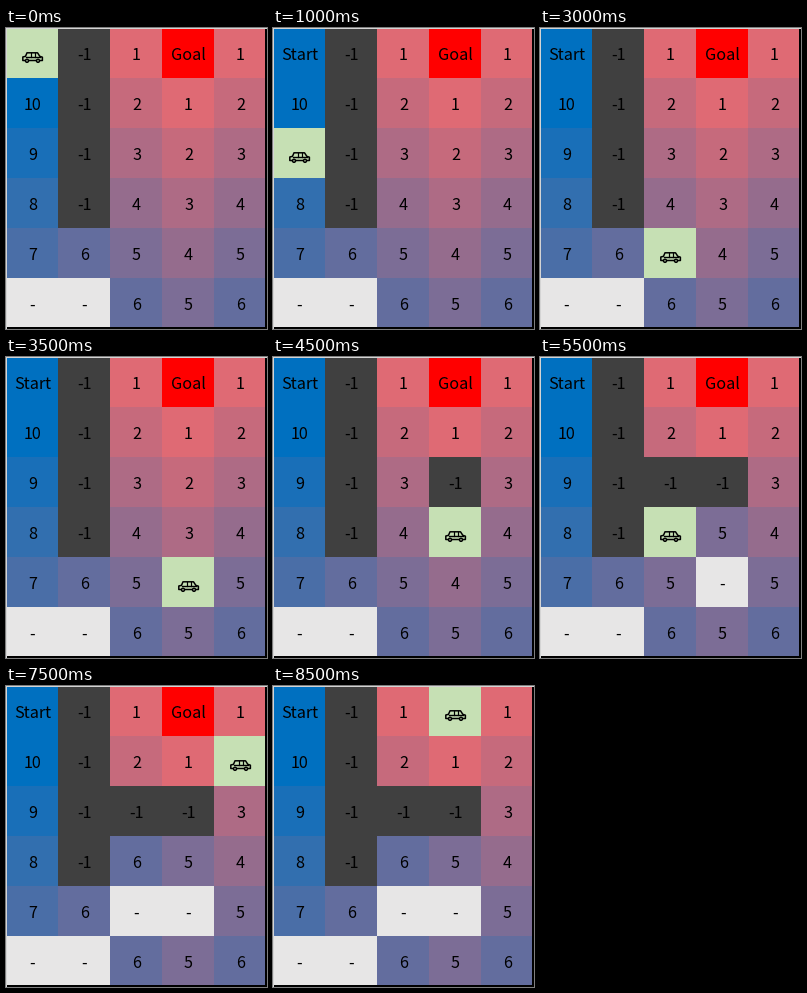
These frames come from a looping animation (261x301 px, 9000 ms). A matplotlib script:

```python
from itertools import product

import matplotlib.pyplot as plt
from matplotlib.animation import FuncAnimation
from matplotlib.patches import Circle, Polygon, Rectangle
from matplotlib.transforms import Affine2D

W, H, DPI = 261, 301, 64
PX = 72 / DPI  # points per pixel
ROWS, COLS = 6, 5
CELL_W, CELL_H = 52, 50
STEPS, STEP_MS = 18, 500

START, GOAL = (0, 0), (0, 3)
WALLS = {(r, 1) for r in range(4)}
HIDDEN_WALLS = {(2, 2), (2, 3)}  # found only when the car reaches them
UNSEEN = {(5, 0), (5, 1)}
CELLS = list(product(range(ROWS), range(COLS)))

COLD, HOT = (0, 112, 192), (248, 105, 107)
CAR_FILL, START_FILL, GOAL_FILL = "#c6e0b4", "#0070c0", "#ff0000"
WALL_FILL, BLANK_FILL = "#404040", "#e7e6e6"
WALL, BLANK = -1, None


def neighbours(cell):
    """Left, right, up, down: earlier ones win ties."""
    r, c = cell
    around = [(r, c - 1), (r, c + 1), (r - 1, c), (r + 1, c)]
    return [n for n in around if n in CELLS]


def goal_distances():
    dist = dict.fromkeys(CELLS, BLANK)
    dist.update(dict.fromkeys(WALLS, WALL))
    dist[GOAL] = 0
    queue = [GOAL]
    for cell in queue:
        for n in neighbours(cell):
            if dist[n] is BLANK and n not in UNSEEN:
                dist[n] = dist[cell] + 1
                queue.append(n)
    return dist


def best_neighbour(dist, car):
    options = [n for n in neighbours(car) if dist[n] not in (WALL, BLANK)]
    return min(options, key=dist.get)


def replan(dist, car):
    """Blank the cells that relied on the car's cell, then re-cost it."""
    old = dist[car]
    for n in neighbours(car):
        support = [m for m in neighbours(n) if m != car and dist[m] == old]
        if dist[n] == old + 1 and not support:
            dist[n] = BLANK
    dist[car] = dist[best_neighbour(dist, car)] + 1


def simulate():
    dist, car, bumped = goal_distances(), START, False
    states = [(car, dict(dist))]
    while len(states) < STEPS:
        if bumped:
            replan(dist, car)
        target = best_neighbour(dist, car)
        bumped = target in HIDDEN_WALLS
        if bumped:
            dist[target] = WALL
        else:
            car = target
        states.append((car, dict(dist)))
    return states


def cell_look(cell, value):
    if cell == START:
        return "Start", START_FILL
    if cell == GOAL:
        return "Goal", GOAL_FILL
    if value is BLANK:
        return "-", BLANK_FILL
    if value == WALL:
        return "-1", WALL_FILL
    k = value / 10
    return str(value), tuple((h + (c - h) * k) / 255 for h, c in zip(HOT, COLD))


fig = plt.figure(figsize=(W / DPI, H / DPI), dpi=DPI, facecolor="white")
ax = fig.add_axes([0, 0, 1, 1])
ax.set_xlim(0, W)
ax.set_ylim(H, 0)
ax.axis("off")


def box(x, y, w, h, color, z=1):
    return ax.add_patch(Rectangle((x, y), w, h, fc=color, lw=0, aa=False, zorder=z))


box(0, 0, W, H, "#d4d4d4", 0)
box(W - 2, 1, 2, H - 1, "black", 3)
box(1, H - 2, W - 1, 2, "black", 3)

tiles, labels = {}, {}
for r, c in CELLS:
    x, y = c * CELL_W, r * CELL_H
    left, top = max(x, 1), max(y, 1)
    tiles[r, c] = box(left, top, x + CELL_W - left, y + CELL_H - top, "white")
    labels[r, c] = ax.text(x + 26.5, y + 32, "", fontsize=16.2 * PX,
                           family="Noto Sans CJK JP", color="black",
                           ha="center", va="baseline", zorder=2)

car_pos = Affine2D()
car_tr = car_pos + ax.transData


def car_patch(patch, width):
    patch.set(facecolor=CAR_FILL, edgecolor="black", linewidth=width * PX,
              transform=car_tr, zorder=4, joinstyle="round")
    ax.add_artist(patch)


def car_line(xs, ys, width):
    ax.add_artist(plt.Line2D(xs, ys, color="black", lw=width * PX,
                             transform=car_tr, zorder=4))


# bonnet, cabin and boot outline, then belt line, posts and wheels
car_patch(Polygon([(16.8, 32.5), (16.8, 29), (19.5, 28.3), (21, 24.8),
                   (31.5, 24.8), (33.8, 28.3), (36.4, 29.2), (36.4, 32.5)]), 1.5)
car_line([19.5, 34], [28.5, 28.5], 1.4)
for x in (24.5, 28.5):
    car_line([x, x], [24.8, 28.5], 1.2)
for x in (21, 32):
    car_patch(Circle((x, 32.8), 1.5), 1.5)

STATES = simulate()


def draw(step):
    car, dist = STATES[step]
    for cell, value in dist.items():
        text, fill = ("", CAR_FILL) if cell == car else cell_look(cell, value)
        labels[cell].set_text(text)
        tiles[cell].set_facecolor(fill)
    car_pos.clear().translate(car[1] * CELL_W, car[0] * CELL_H)
    return []


anim = FuncAnimation(fig, draw, frames=STEPS, interval=STEP_MS,
                     init_func=lambda: draw(0), repeat=True, repeat_delay=0)
plt.show()
```
